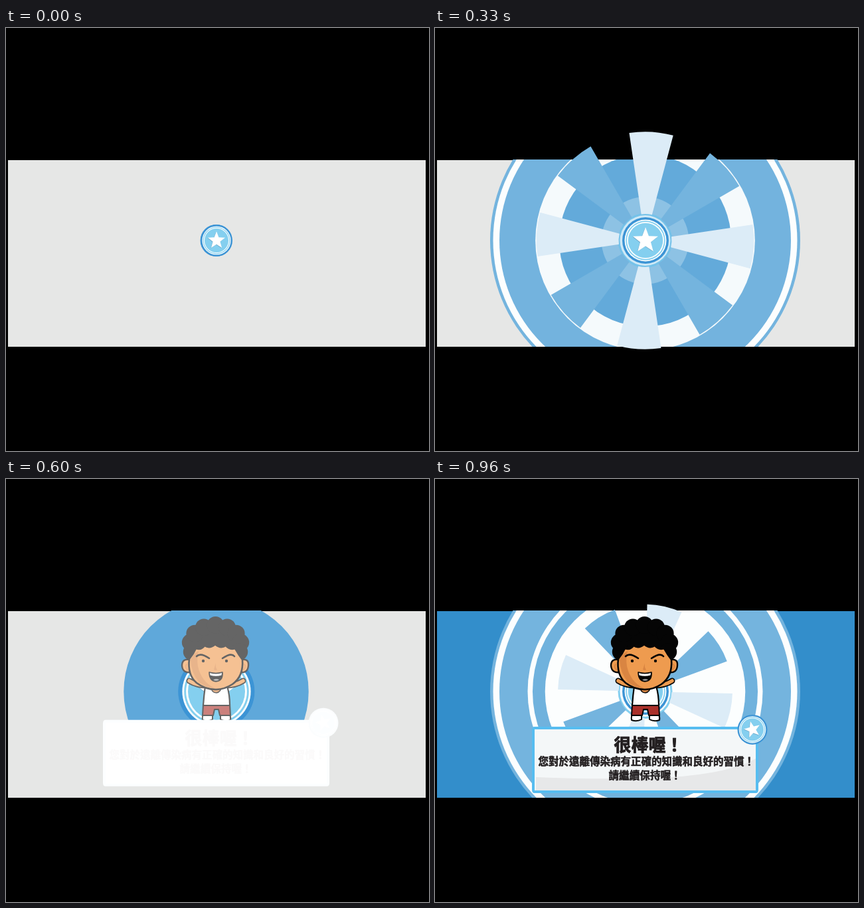
An HTML page with a canvas that plays this animation: 637x637 px, repeating every 990 ms.

```html
<!DOCTYPE html>
<html lang="zh-Hant">
<head>
<meta charset="utf-8">
<title>Spinning wheel award</title>
<style>
html, body { margin: 0; width: 100%; height: 100%; overflow: hidden; background: #000; }
canvas { display: block; }
</style>
</head>
<body>
<canvas width="637" height="637"></canvas>
<script>
const ctx = document.querySelector('canvas').getContext('2d');
const LOOP = 990, STEP = 30, RESTART = 510, CX = 316.5, CY = 320;
const BLUE = '#74b4de', DEEP = '#58a4d8', DARK = '#3c94d5', SKY = '#84cfef', WHITE = '#fcfefe', INK = '#050505';
const FONT = '"Noto Sans CJK TC", "Noto Sans CJK SC", "Noto Sans CJK", sans-serif';

// Rings open from the centre one after another, the largest first
const RINGS = [
  { radius: 233.5, start: 30, span: 230 },
  { radius: 229, start: 135, span: 150, white: true },
  { radius: 219.5, start: 165, span: 172 },
  { radius: 177, start: 172, span: 265, white: true },
  { radius: 170, start: 235, span: 250 },
  { radius: 153, start: 295, span: 205, white: true }
];

const ramp = (t, start, span) => Math.min(1, Math.max(0, (t - start) / span));
const easeOut = u => 1 - (1 - u) ** 3;

function mix(a, b, amount) {
  const channel = (c, i) => parseInt(c.slice(1 + 2 * i, 3 + 2 * i), 16);
  const out = [0, 1, 2].map(i => Math.round(channel(a, i) + (channel(b, i) - channel(a, i)) * amount));
  return '#' + out.map(v => v.toString(16).padStart(2, '0')).join('');
}

function disc(x, y, r, color, alpha = 1) {
  ctx.save();
  ctx.globalAlpha *= alpha;
  ctx.fillStyle = color;
  ctx.beginPath();
  ctx.arc(x, y, r, 0, 2 * Math.PI);
  ctx.fill();
  ctx.restore();
}

function shape(d, fill, stroke, width = 2) {
  const path = new Path2D(d);
  if (fill) { ctx.fillStyle = fill; ctx.fill(path); }
  if (stroke) { ctx.strokeStyle = stroke; ctx.lineWidth = width; ctx.stroke(path); }
}

function star(x, y, r, turn, color) {
  ctx.beginPath();
  for (let i = 0; i < 10; i++) {
    const a = turn + i * Math.PI / 5, d = i % 2 ? r * 0.42 : r;
    ctx.lineTo(x + d * Math.sin(a), y - d * Math.cos(a));
  }
  ctx.fillStyle = color;
  ctx.fill();
}

function badge(x, y, r, turn = 0, paint = c => c) {
  [DARK, WHITE, SKY, WHITE, SKY].forEach((color, i) =>
    disc(x, y, r * (i ? 0.95 - 0.05 * i : 1), paint(color)));
  star(x - 0.6, y + 0.6, r * 0.57, turn, paint('#70a9c8'));
  star(x, y, r * 0.57, turn, paint('#ffffff'));
}

function rings(p) {
  for (const { radius, start, span, white } of RINGS) {
    const u = ramp(p, start, span);
    disc(CX, CY, radius * easeOut(u), white ? WHITE : mix(DEEP, BLUE, u), white ? Math.min(1, 1.6 * u) : 1);
  }
}

// The centre swells, then drops back once the blades are out
const centreSize = (p, drop, span) => 24 + 40 * easeOut(ramp(p, 0, 200)) - drop * easeOut(ramp(p, 210, span));

function blades(p, turn) {
  const outer = 180 * easeOut(ramp(p, 110, 160)) - 0.27 * Math.max(0, p - 270);
  const inner = centreSize(p, 24, 75);
  if (outer <= inner) return;
  for (let i = 0; i < 8; i++) {
    const a = (turn + i * 45 - 90) * Math.PI / 180, half = 0.204;
    ctx.beginPath();
    ctx.arc(CX, CY, outer, a - half, a + half);
    ctx.arc(CX, CY, inner, a + half, a - half, true);
    ctx.fillStyle = i % 2 ? BLUE : '#dcecf7';
    ctx.fill();
  }
}

function hub(p) {
  disc(CX, CY, centreSize(p, 23, 90), mix('#469ad6', SKY, ramp(p, 240, 120)));
}

function core(p) {
  disc(CX, CY, 38, WHITE, ramp(p, 270, 90));
  badge(CX + 0.5, CY, centreSize(p, 29, 45));
}

function hair(color) {
  ctx.fillStyle = color;
  ctx.beginPath();
  ctx.ellipse(315.5, 250, 40, 34, 0, 0, 2 * Math.PI);
  ctx.fill();
  const bumps = 9, low = 0.35;
  for (let i = 0; i < bumps; i++) {
    const a = Math.PI - low + i * (Math.PI + 2 * low) / (bumps - 1);
    disc(315.5 + 38 * Math.cos(a), 250 + 30 * Math.sin(a), 13, color);
  }
}

function boy(t) {
  const fade = 1 - ramp(t, 440, 260);
  const paint = c => mix(c, '#ffffff', fade);
  const ink = paint(INK), skin = paint('#ee9b4f'), shade = paint('#d98542'), white = paint('#ffffff');
  ctx.save();
  ctx.globalAlpha = ramp(t, 390, 65);
  ctx.translate(0, -5 * (1 - ramp(t, 450, 150)));
  ctx.lineCap = ctx.lineJoin = 'round';

  for (const arm of ['M303 311Q287 311 276 304', 'M330 311Q346 311 357 304']) {
    shape(arm, null, ink, 9);
    shape(arm, null, skin, 5.5);
  }
  shape('M298 353H311V362Q304 366 296 363Q295 357 298 353ZM323 353H336Q339 358 338 363Q330 366 323 362Z', white, ink);
  shape('M297 339H337L338 356H322L320 347H314L312 356H296Z', paint('#aa302a'), ink);
  shape('M300 312Q298 326 297 341H337Q337 325 333 312Z', white, ink, 2.2);
  shape('M308 311Q309 322 317 322Q324 321 325 311Z', shade, ink, 1.5);

  shape('M277 272Q265 270 265 281Q266 293 279 291ZM354 272Q366 270 365 281Q364 293 352 291Z', skin, ink, 2.4);
  shape('M272 279Q269 283 273 287M359 279Q362 283 358 287', null, shade, 2);
  hair(ink);
  shape('M276 271Q282 264 286 255Q294 258 299 251Q307 256 315 249Q323 256 331 251Q337 258 345 255Q350 264 356 272Q358 297 341 309Q329 317 316 317Q300 317 287 307Q273 295 276 271Z', skin, ink, 2.6);
  shape('M278 272Q279 293 291 306Q302 315 314 315Q294 305 289 282Q287 269 290 259Q281 264 278 272Z', shade);

  shape('M287 267Q293 261 306 270M326 270Q339 261 344 267', null, ink, 2.6);
  disc(297, 274, 2.2, ink);
  disc(332, 274, 2.2, ink);
  shape('M316 277Q315 284 318 287Q316 289 313 287', shade);
  shape('M306 291Q316 294 326 291Q327 304 316 305Q306 304 306 291Z', ink, ink, 1.5);
  shape('M307 292Q316 295 325 292L324.500 295.500Q316 298 307.500 295.500Z', white);
  shape('M312 302.500Q317 300 321 302.500Q316 305 312 302.500Z', paint('#a9a9a9'));
  ctx.restore();
}

function card(t) {
  const veil = mix('#86c8ea', '#ffffff', ramp(t, 450, 100));
  const amount = Math.min(0.72 + 0.28 * ramp(t, 450, 90), 1 - ramp(t, 595, 245));
  const paint = c => mix(c, veil, amount);
  const s = t - 480, bounce = -24 * Math.exp(-0.0071 * s) * Math.sin(Math.PI * s / 235);
  ctx.save();
  ctx.globalAlpha = ramp(t, 380, 100);
  ctx.translate(0, bounce);
  ctx.lineJoin = 'round';
  shape('M150 375H483Q485 375 485 378V468Q485 471 483 471H150Q148 471 148 468V378Q148 375 150 375Z', paint('#f4f7f8'), paint('#57bdf0'), 4);
  shape('M152 449Q250 453 340 450Q440 445 483 421V467Q483 469 480 469H152Z', paint('#e7e8e9'));
  ctx.fillStyle = ctx.strokeStyle = paint('#231f20');
  const line = (text, x, y, size) => {
    ctx.font = `900 ${size}px ${FONT}`;
    ctx.lineWidth = size * 0.035;
    ctx.fillText(text, x, y);
    ctx.strokeText(text, x, y);
  };
  line('很棒喔！', 269.5, 410, 26);
  line('您對於遠離傳染病有正確的知識和良好的習慣！', 155.5, 431.5, 15.5);
  line('請繼續保持喔！', 261.5, 452.5, 15.6);
  badge(478, 377.5, 20.5 + 2 * ramp(t, 450, 150), -0.25, c => mix(c, '#ffffff', amount));
  ctx.restore();
}

function inStage(bottom, paint) {
  ctx.save();
  ctx.beginPath();
  ctx.rect(3, 198, 629, bottom - 198);
  ctx.clip();
  paint();
  ctx.restore();
}

function draw(t) {
  const again = t >= RESTART, p = again ? t - RESTART : t;
  const turn = again ? 4.3 + 8.7 * ramp(p, 210, 240) ** 2.6 : 17 - p / 24;
  ctx.fillStyle = '#000';
  ctx.fillRect(0, 0, 637, 637);
  ctx.fillStyle = mix('#e6e7e6', '#338ecb', ramp(t, 630, 330));
  ctx.fillRect(3, 199, 629, 281);
  inStage(480, () => { rings(p); hub(p); });
  blades(p, turn);
  inStage(482, () => { core(p); boy(t); card(t); });
}

function tick() {
  draw(Math.floor(performance.now() % LOOP / STEP) * STEP);
  requestAnimationFrame(tick);
}
tick();
</script>
</body>
</html>
```
